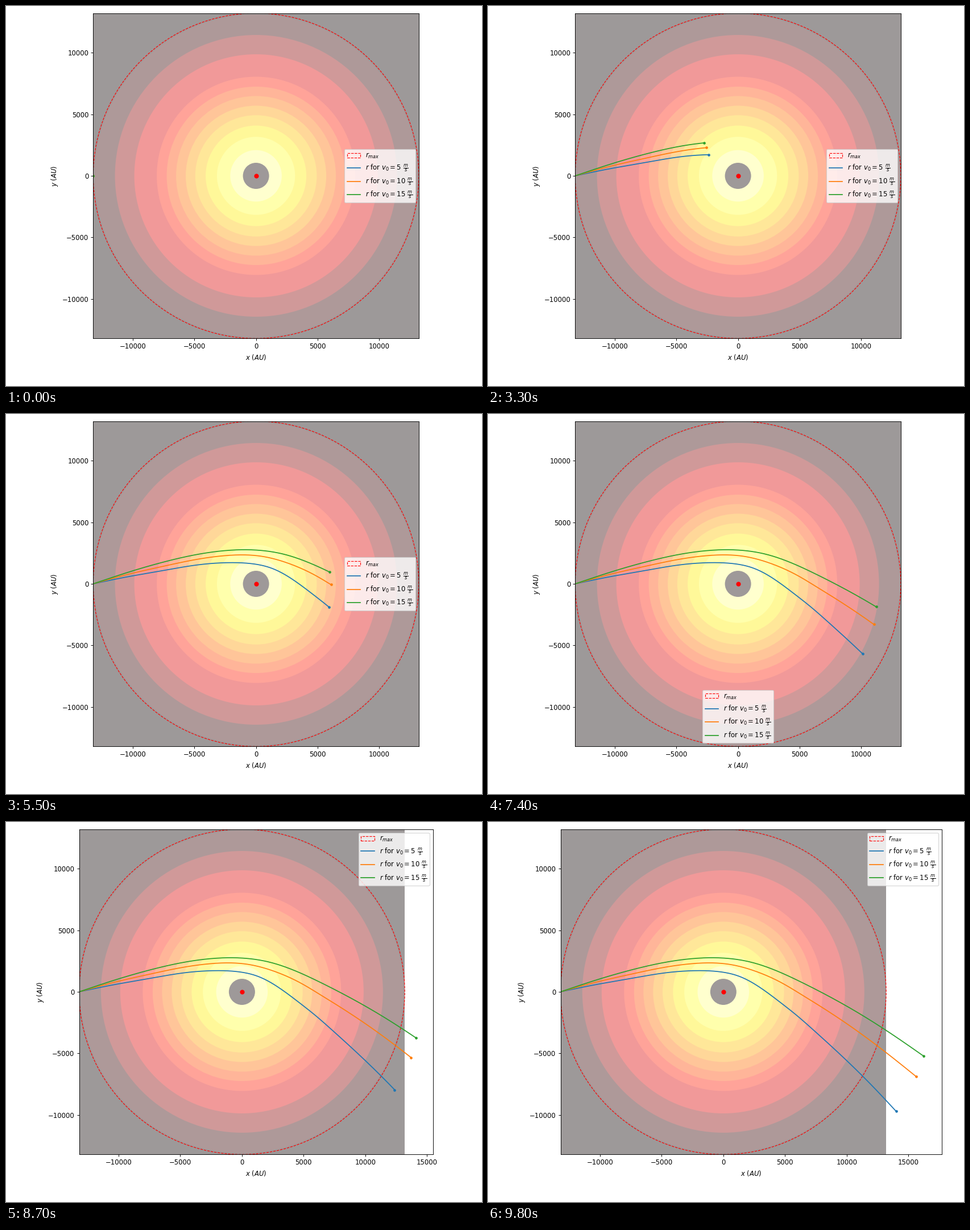
Animation of 837x669 px, one loop 9.9 s. Source, as a matplotlib script:

```python
import numpy as np
import matplotlib.pyplot as plt
from matplotlib.animation import FuncAnimation
from matplotlib.patches import Circle, Rectangle
from matplotlib.ticker import MultipleLocator

W, H, DPI = 837, 669, 83.7
FRAMES, INTERVAL = 99, 100
R_MAX = 13200
TOP, BOTTOM = 12.7, 585.3            # plot edges in pixels from the top
SCALE = (BOTTOM - TOP) / (2 * R_MAX)  # pixels per AU
MID_X, MIN_LEFT = 439.6, 127.5
SUB = 6                              # path samples per frame

# Band radii in pixels and their positions on the "hot" colour map
RADII = [284, 248, 214, 174.5, 157, 140.5, 123.5, 106.8, 88.5, 68.7, 45.3, 23]
HEAT = [.0625, .1875, .3125, .406, .469, .531, .594, .656, .719, .79, .875, 1]

# Path knots: frame, then x and y in pixels from the centre
KNOTS = [0, 10, 20, 33, 40, 45, 50, 55, 60, 74, 83, 98]
PATHS = {
    5: ([-286.3, -225.3, -157, -51.5, 20, 62.5, 98.8, 128.5, 156, 219.5, 254.5, 304],
        [0, 12.5, 24.5, 37.2, 30, 9, -17.5, -41, -65, -123.5, -158, -210.5]),
    10: ([-286.3, -226, -159.5, -56, 8.5, 54.5, 97, 132, 164, 239, 280.5, 339.5],
         [0, 16.5, 31.7, 49.5, 48.7, 37, 18.8, -1.5, -21.3, -71.5, -102.5, -149.5]),
    15: ([-286.3, -227, -162, -59.5, 2.5, 47.5, 90.5, 129, 162.5, 243, 288, 352],
         [0, 19.7, 38.5, 58, 59.3, 52.5, 38.3, 21, 4.3, -40.5, -69, -113]),
}


def spline(t, knots, values):
    """Natural cubic spline through the knots."""
    k, v = np.array(knots, float), np.array(values, float)
    h = np.diff(k)
    n = len(k)
    a, b = np.eye(n), np.zeros(n)
    for i in range(1, n - 1):
        a[i, i - 1:i + 2] = h[i - 1], 2 * (h[i - 1] + h[i]), h[i]
        b[i] = 6 * ((v[i + 1] - v[i]) / h[i] - (v[i] - v[i - 1]) / h[i - 1])
    m = np.linalg.solve(a, b)
    i = np.clip(np.searchsorted(k, t) - 1, 0, n - 2)
    p, q, d = k[i + 1] - t, t - k[i], h[i]
    return ((m[i] * p**3 + m[i + 1] * q**3) / (6 * d)
            + (v[i] / d - m[i] * d / 6) * p + (v[i + 1] / d - m[i + 1] * d / 6) * q)


def heat_color(v, alpha=0.4):
    return 1 - alpha + alpha * np.array(plt.cm.hot(v)[:3])


times = np.linspace(0, FRAMES - 1, (FRAMES - 1) * SUB + 1)
tracks = [[spline(times, KNOTS, c) / SCALE for c in xy] for xy in PATHS.values()]

# The tiny extra height guards against rounding down to one pixel less
fig = plt.figure(figsize=(W / DPI, (H + 1e-3) / DPI), dpi=DPI, facecolor="white")
ax = fig.add_axes([0.1, 0.1, 0.8, 0.8])
ax.set_ylim(-R_MAX, R_MAX)
for axis in (ax.xaxis, ax.yaxis):
    axis.set_major_locator(MultipleLocator(5000))
ax.set_xlabel(r"$x\ (AU)$")
ax.set_ylabel(r"$y\ (AU)$")

ax.add_patch(Rectangle((-R_MAX, -R_MAX), 2 * R_MAX, 2 * R_MAX,
                       fc=heat_color(0), lw=0, zorder=0))
for radius, v in zip(RADII, HEAT):
    ax.add_patch(Circle((0, 0), radius / SCALE, fc=heat_color(v), lw=0, zorder=0.5))

limit = ax.add_patch(Circle((0, 0), R_MAX, fill=False, ec="red", ls="--", lw=1,
                            label=r"$r_{max}$"))
ax.plot(0, 0, "o", color="red", ms=6)
lines, dots = [], []
for i, speed in enumerate(PATHS):
    label = rf"$r$ for $v_0 = {speed}\ \frac{{m}}{{s}}$"
    lines += ax.plot([], [], color=f"C{i}", lw=1.5, label=label)
    dots += ax.plot([], [], ".", color=f"C{i}", ms=6)
legend = ax.legend(handles=[limit] + lines, loc="center right")


def place_axes(right):
    width = (right + R_MAX) * SCALE
    left = max(MID_X - width / 2, MIN_LEFT)
    ax.set_xlim(-R_MAX, right)
    ax.set_position([left / W, 1 - BOTTOM / H, width / W, (BOTTOM - TOP) / H])


def update(frame):
    end = frame * SUB
    for (x, y), line, dot in zip(tracks, lines, dots):
        line.set_data(x[:end + 1], y[:end + 1])
        dot.set_data([x[end]], [y[end]])

    # The view widens with a 5 % margin once a body leaves the map
    far = max(x[end] for x, _ in tracks)
    place_axes(far + 0.05 * (far + R_MAX) if far > R_MAX else R_MAX)

    if frame < 59:
        legend.set_loc("center right")
    elif frame < 87:
        legend.set_loc("lower center")
    else:
        legend.set_loc("upper right")
    return lines + dots


anim = FuncAnimation(fig, update, frames=FRAMES, interval=INTERVAL,
                     repeat=True, repeat_delay=0, blit=False)
plt.show()
```
